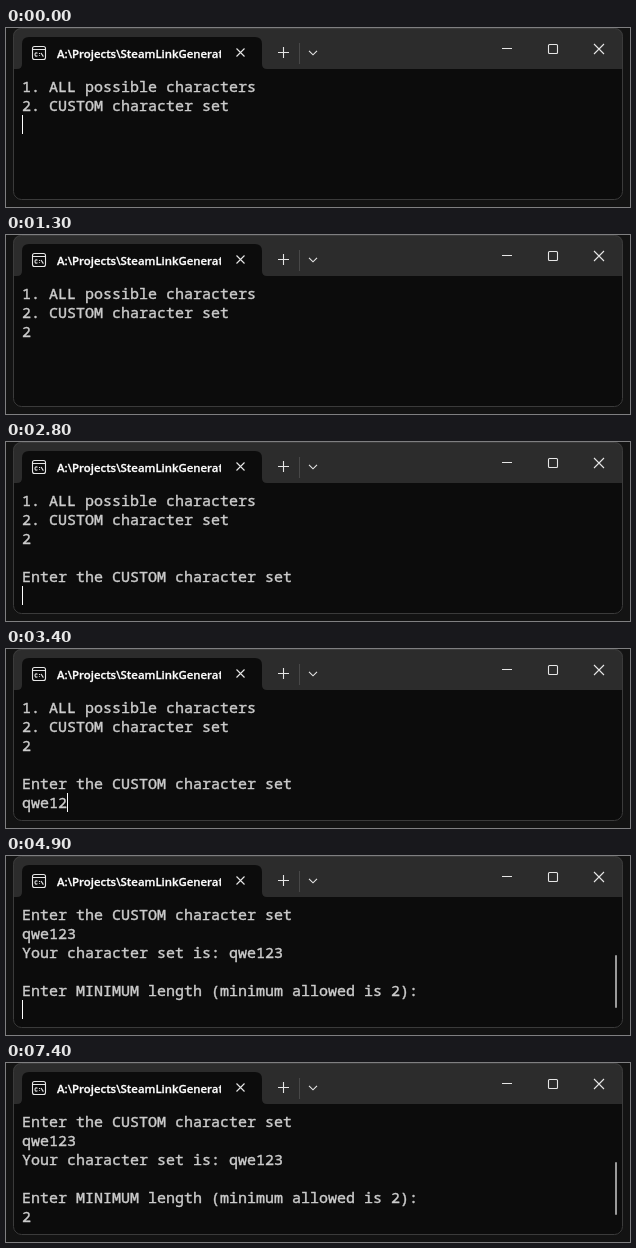
Write an HTML page that moves like this. It is 624x179 px and loops after 8 s.

```html
<!DOCTYPE html>
<html lang="en">
<head>
<meta charset="utf-8">
<title>Terminal session</title>
<style>
html, body { margin: 0; width: 100%; height: 100%; overflow: hidden; background: #131313; }
svg { display: block; }
#lines { font: 15px "Noto Sans Mono", "DejaVu Sans Mono", monospace; fill: #ccc; stroke: #ccc; stroke-width: .4; white-space: pre; }
#title { font: 600 11.4px "Open Sans", "Noto Sans", sans-serif; fill: #fff; stroke: #fff; stroke-width: .3; }
.icon { fill: none; stroke: #e6e6e6; stroke-width: 1.1; }
</style>
</head>
<body>
<svg width="624" height="179" viewBox="0 0 624 179">
  <defs>
    <clipPath id="window"><rect x="7" width="610" height="172" rx="8"/></clipPath>
    <clipPath id="label"><rect x="50" y="12" width="165" height="26"/></clipPath>
  </defs>
  <g clip-path="url(#window)">
    <rect x="7" width="610" height="172" fill="#0c0c0c"/>
    <rect x="7" width="610" height="41" fill="#2c2c2c"/>
    <path d="M11 41q5 0 5-5V16q0-7 7-7H249q7 0 7 7V36q0 5 5 5z" fill="#0c0c0c"/>
  </g>
  <rect x="7.5" y=".5" width="609" height="171" rx="8" fill="none" stroke="#3b3b3b"/>
  <g class="icon">
    <rect x="26.5" y="18.5" width="13" height="13" rx="2"/>
    <path d="M27 21.5H39M31.5 25.2q-2.5-1-2.5 1.3t2.5 1.3M33.5 25v.9M33.5 27.2v.9M35 25l2.4 3.6"/>
    <path d="M230.5 20.5l8 8m0-8l-8 8"/>
    <path d="M272 24.5H283M277.5 19V30M303 22.8l4 4 4-4"/>
    <path d="M293.5 15V36" stroke="#484848"/>
    <path d="M496 20.5H506M588 16l10 10m0-10l-10 10"/>
    <rect x="542.5" y="16.5" width="9" height="9" rx="1"/>
  </g>
  <g clip-path="url(#label)"><text id="title" x="51" y="30">A:\Projects\SteamLinkGenerator</text></g>
  <g id="lines"></g>
  <rect id="cursor" width="1" height="19" fill="#fff"/>
  <rect id="scroll" x="609" y="99" width="2" height="53" rx="1" fill="#9a9a9a"/>
</svg>
<script>
const LOOP = 8000, LEFT = 16, ROW = 19, CHAR = 9;
const byId = id => document.getElementById(id);
const lines = byId("lines"), cursor = byId("cursor"), scroll = byId("scroll");

const menu = ["1. ALL possible characters", "2. CUSTOM character set"];
const prompt = "Enter the CUSTOM character set";
const custom = [...menu, "2", "", prompt];
const minimum = [prompt, "qwe123", "Your character set is: qwe123", "",
  "Enter MINIMUM length (minimum allowed is 2):"];

// [start time, finished rows, text being typed]
const states = [
  [0, menu, ""], [700, menu, "2"],
  [1700, custom, ""], [2900, custom, "qwe"],
  [3300, custom, "qwe1"], [3400, custom, "qwe12"], [3500, custom, "qwe123"],
  [4900, minimum, ""], [6800, minimum, "2"]
];
// Times at which the cursor is shown and hidden
const visible = [[0, 200], [700, 1300], [1700, 2300], [2800, 4100],
  [4600, 5500], [6100, 6600], [6800, 7400]];

const rows = Array.from({ length: 6 }, (_, i) => {
  const row = document.createElementNS("http://www.w3.org/2000/svg", "text");
  row.setAttribute("x", LEFT);
  row.setAttribute("y", 64 + i * ROW);
  return lines.appendChild(row);
});

let shown;
function draw(now) {
  const t = now % LOOP;
  const state = states.findLast(s => t >= s[0]);
  const [, done, typed] = state;
  if (state !== shown) {
    const text = [...done, typed];
    rows.forEach((row, i) => row.textContent = text[i] || "");
    cursor.setAttribute("x", LEFT + typed.length * CHAR);
    cursor.setAttribute("y", 49 + done.length * ROW);
    scroll.style.display = done === minimum ? "" : "none";
    shown = state;
  }
  cursor.style.display = visible.some(([on, off]) => t >= on && t < off) ? "" : "none";
  requestAnimationFrame(() => draw(performance.now() - start));
}
const start = performance.now();
draw(0);
</script>
</body>
</html>
```
